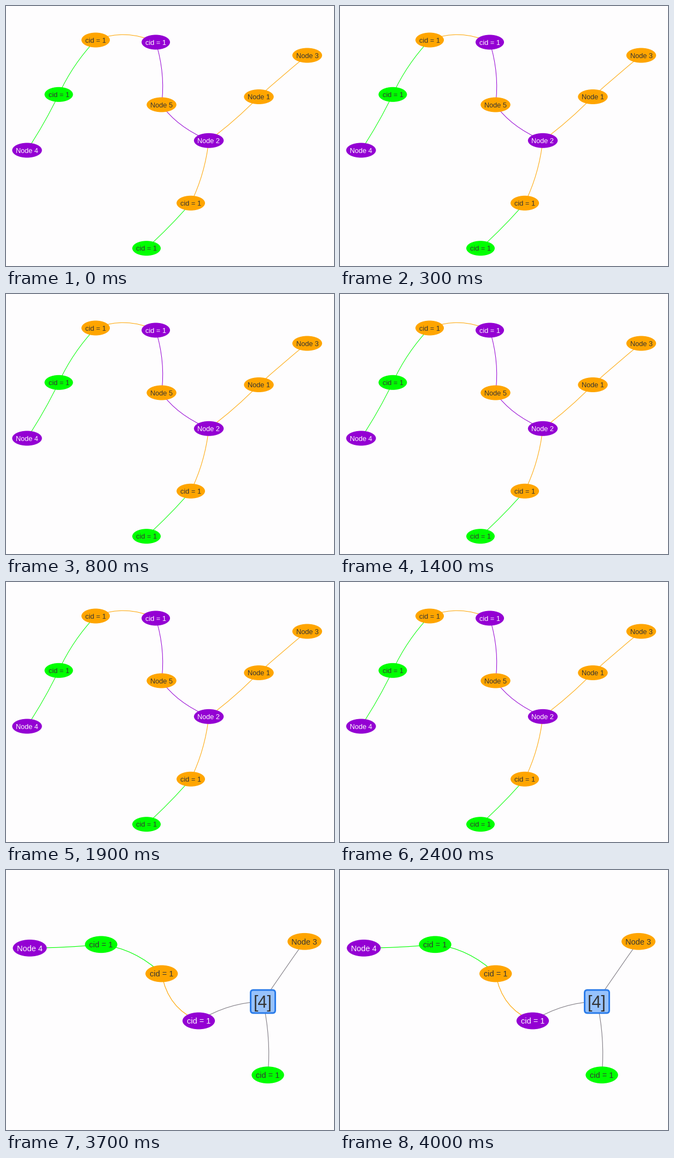
These frames come from a looping animation (600 px wide and 474 px high, 5800 ms). A matplotlib script:

```python
import matplotlib.pyplot as plt
from matplotlib.animation import FuncAnimation
from matplotlib.patches import Ellipse, FancyBboxPatch, PathPatch
from matplotlib.path import Path

W, H, DPI = 600, 474, 64
STEP_MS, LOOP_MS, CLUSTER_MS = 100, 5800, 3300
PT = 72 / DPI

ORANGE, VIOLET, LIME = "#ffa500", "#9400d3", "#00ff00"
GRAY, INK, PAPER = "#848088", "#343434", "#fefdfe"

fig = plt.figure(figsize=(W / DPI, H / DPI), dpi=DPI, facecolor=PAPER)
ax = fig.add_axes([0, 0, 1, 1])
ax.set_xlim(0, W)
ax.set_ylim(H, 0)
ax.axis("off")


def label(x, y, text, size, color):
    return ax.text(x, y + 0.36 * size, text, fontsize=size * PT, color=color,
                   family="Liberation Sans", ha="center", va="baseline", zorder=3)


def edge(start, ctrl, end, color, width):
    path = Path([start, ctrl, end], [Path.MOVETO, Path.CURVE3, Path.CURVE3])
    return ax.add_patch(PathPatch(path, fc="none", ec=color, lw=width * PT, zorder=1))


def node(x, y, text, color, scale):
    rx = 27.2 if text.startswith("Node") else 26
    oval = Ellipse((x, y), 2 * rx * scale, 27 * scale, fc=color, lw=0, zorder=2)
    ink = "white" if color == VIOLET else INK
    return [ax.add_patch(oval), label(x, y, text, 12.7 * scale, ink)]


def cluster(x, y, text):
    w, h, r = 45, 42, 5
    box = FancyBboxPatch((x - w / 2 + r, y - h / 2 + r), w - 2 * r, h - 2 * r,
                         boxstyle=f"round,pad={r}", fc="#97c2fc", ec="#2b7ce9",
                         lw=3 * PT, zorder=2)
    return [ax.add_patch(box), label(x, y, text, 30.6, INK)]


def graph(nodes, edges, scale):
    """Build one layout; edges run between node centres through a control point."""
    parts = []
    for a, ctrl, b, color in edges:
        parts.append(edge(nodes[a][:2], ctrl, nodes[b][:2], color, scale))
    for x, y, text, color in nodes.values():
        parts += node(x, y, text, color, scale) if color else cluster(x, y, text)
    return parts


expanded = graph(
    {
        "n4": (38.5, 263, "Node 4", VIOLET),
        "g1": (96.5, 161.3, "cid = 1", LIME),
        "o1": (164, 62, "cid = 1", ORANGE),
        "v1": (274, 66, "cid = 1", VIOLET),
        "n5": (284.5, 180, "Node 5", ORANGE),
        "n2": (371, 245.3, "Node 2", VIOLET),
        "n1": (462.5, 165.5, "Node 1", ORANGE),
        "n3": (551, 90, "Node 3", ORANGE),
        "o2": (338, 359.3, "cid = 1", ORANGE),
        "g2": (257, 441.7, "cid = 1", LIME),
    },
    [
        ("n4", (71, 214), "g1", LIME),
        ("g1", (122, 106), "o1", LIME),
        ("o1", (219, 40.5), "v1", ORANGE),
        ("v1", (292, 124), "n5", VIOLET),
        ("n5", (312, 220), "n2", VIOLET),
        ("n2", (420, 209), "n1", ORANGE),
        ("n1", (506, 126), "n3", ORANGE),
        ("n2", (364, 307), "o2", ORANGE),
        ("o2", (300, 403), "g2", LIME),
    ],
    1,
)

clustered = graph(
    {
        "n4": (43.5, 142.3, "Node 4", VIOLET),
        "g1": (174, 135.8, "cid = 1", LIME),
        "o1": (284.7, 189, "cid = 1", ORANGE),
        "v1": (352.5, 275, "cid = 1", VIOLET),
        "box": (470, 239.8, "[4]", None),
        "n3": (546, 130.3, "Node 3", ORANGE),
        "g2": (479, 373.7, "cid = 1", LIME),
    },
    [
        ("n4", (109, 142), "g1", LIME),
        ("g1", (236, 143), "o1", LIME),
        ("o1", (296, 253), "v1", ORANGE),
        ("v1", (408, 241), "box", GRAY),
        ("box", (507, 184), "n3", GRAY),
        ("box", (485, 306), "g2", GRAY),
    ],
    1.14,
)


def draw(i):
    merged = i * STEP_MS >= CLUSTER_MS
    for part in expanded:
        part.set_visible(not merged)
    for part in clustered:
        part.set_visible(merged)
    return expanded + clustered


anim = FuncAnimation(fig, draw, frames=LOOP_MS // STEP_MS, interval=STEP_MS,
                     repeat=True, repeat_delay=0, blit=False)
plt.show()
```
